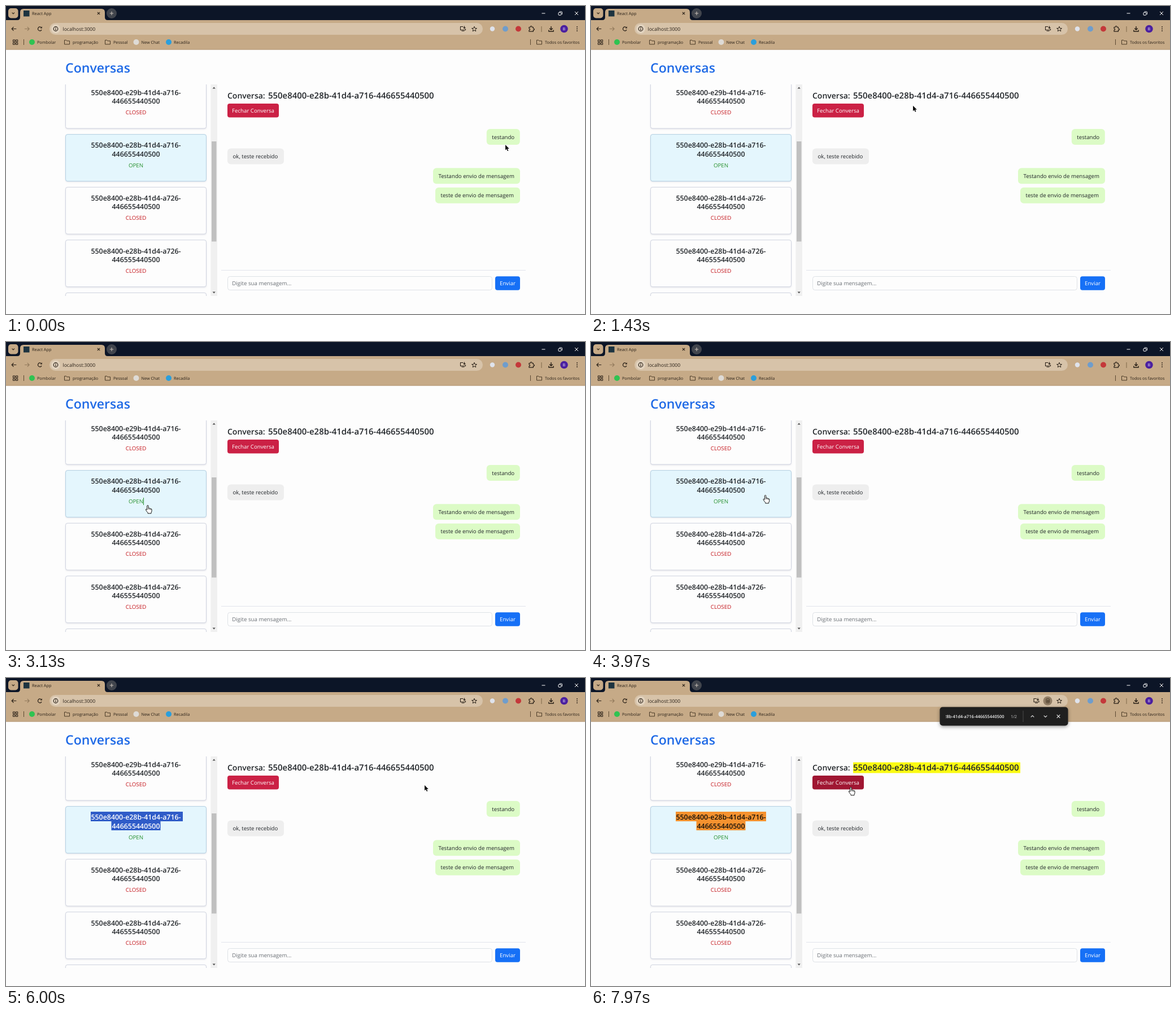
An HTML page with a canvas that plays this animation: 1025 by 546 pixels, repeating every 8000 ms.

```html
<!DOCTYPE html>
<html lang="pt">
<head>
<meta charset="utf-8">
<title>Conversas</title>
<style>
html, body { margin: 0; width: 100%; height: 100%; overflow: hidden; background: #fdfdfd; }
canvas { display: block; width: 1025px; height: 546px; }
</style>
</head>
<body>
<canvas id="stage" width="1025" height="546"></canvas>
<script>
const ctx = document.getElementById('stage').getContext('2d');
const LOOP = 8000;
const FONT = '"Open Sans", "Noto Sans", sans-serif';
const INK = '#2a2118', TAN = '#c6aa87';
const ID = '550e8400-e28b-41d4-a716-446655440500';

// Pointer keys: time, x, y
const PATH = [
  [0, 884, 246], [30, 884, 246], [60, 881, 244], [650, 881, 244], [660, 879, 243],
  [1250, 879, 243], [1430, 572, 176], [1560, 320, 262], [2320, 320, 262],
  [2370, 300, 270], [2690, 300, 270], [2700, 296, 272], [2990, 296, 272],
  [3130, 251, 290], [3320, 251, 290], [3570, 304, 275], [3920, 304, 275],
  [3970, 309, 272], [4430, 155, 254], [5930, 155, 254], [6000, 741, 190],
  [7860, 741, 190], [7970, 460, 194]
];

function pointer(t) {
  let i = 0;
  while (i < PATH.length - 1 && PATH[i + 1][0] <= t) i++;
  const a = PATH[i], b = PATH[i + 1] || a;
  const k = b === a ? 0 : (t - a[0]) / (b[0] - a[0]);
  return [a[1] + (b[1] - a[1]) * k, a[2] + (b[2] - a[2]) * k];
}

const between = (t, a, b) => t >= a && t < b;

function rect(x, y, w, h, fill) {
  ctx.fillStyle = fill;
  ctx.fillRect(x, y, w, h);
}

function box(x, y, w, h, r, fill, stroke, lw = 1) {
  ctx.beginPath();
  ctx.roundRect(x, y, w, h, r);
  if (fill) { ctx.fillStyle = fill; ctx.fill(); }
  if (stroke) { ctx.strokeStyle = stroke; ctx.lineWidth = lw; ctx.stroke(); }
}

function dot(x, y, r, fill) {
  ctx.beginPath();
  ctx.arc(x, y, r, 0, 7);
  ctx.fillStyle = fill;
  ctx.fill();
}

function ring(x, y, r, color, from = 0, to = Math.PI * 2) {
  ctx.beginPath();
  ctx.arc(x, y, r, from, to);
  ctx.strokeStyle = color;
  ctx.lineWidth = 1.2;
  ctx.stroke();
}

function path(d, x, y, stroke, lw = 1.2, fill) {
  ctx.save();
  ctx.translate(x, y);
  const p = new Path2D(d);
  if (fill) { ctx.fillStyle = fill; ctx.fill(p); }
  if (stroke) {
    ctx.strokeStyle = stroke;
    ctx.lineWidth = lw;
    ctx.lineJoin = 'round';
    ctx.stroke(p);
  }
  ctx.restore();
}

function text(s, x, y, size, color, weight = 400, align = 'left') {
  ctx.font = `${weight} ${size}px ${FONT}`;
  ctx.textAlign = align;
  ctx.fillStyle = color;
  ctx.fillText(s, x, y);
}

function folder(x, y) {
  path('M.5 1.5h3.2l1.2 1.4h4.6v6h-9z', x, y - 5, '#4a3a26', 1);
}

function titleBar() {
  rect(0, 0, 1025, 26, '#0c1527');
  box(4, 4, 17.5, 17.5, 5, TAN);
  path('M-2.2 -1l2.2 2.2l2.2 -2.2', 12.8, 12.7, INK);
  path('M0 23q5 0 5 -5v-9q0 -6 6 -6h138q6 0 6 6v9q0 5 5 5v3h-160z', 20, 2, null, 0, TAN);
  rect(31, 8, 10.5, 10.5, '#1d3440');
  text('React App', 46, 16, 7.4, INK);
  path('M-2.2 -2.2l4.4 4.4M2.2 -2.2l-4.4 4.4', 164, 13, INK, 1.1);
  dot(187, 13, 9, '#41454d');
  path('M-3.2 0h6.4M0 -3.2v6.4', 187, 13, '#c9c2b8', 1.1);
  path('M-3 0h6', 951.5, 13, '#fff', 1);
  box(978, 11.5, 4.8, 4.8, 1, null, '#fff');
  path('M0 0h4q1 0 1 1v4', 979.5, 10, '#fff', 0.9);
  path('M-3 -3l6 6M3 -3l-6 6', 1010, 13, '#fff', 1);
}

function toolbar(finding) {
  rect(0, 25, 1025, 52.5, TAN);
  rect(0, 76.5, 1025, 1, '#b79c7a');
  path('M4 0h-8M-.8 -3.3l-3.3 3.3l3.3 3.3', 14.3, 40.5, INK);
  path('M-4 0h8M.8 -3.3l3.3 3.3l-3.3 3.3', 37, 40.5, '#927a5c');
  ring(60, 40.5, 3.4, INK, 0.5, 5.4);
  path('M3.8 -4.2v3.2h-3.2z', 60, 40.5, null, 0, INK);

  box(77, 30, 767, 21, 10.5, '#d7c3a9');
  dot(88, 40.5, 8, '#e2d3bf');
  ring(88, 40.5, 3.8, INK);
  rect(87.4, 40, 1.2, 2.8, INK);
  rect(87.4, 38, 1.2, 1.2, INK);
  text('localhost:3000', 100.5, 43.6, 8.55, INK);

  const ix = finding ? 788 : 808.5;
  path('M1 -3.5h-5v6h9v-2M-2 4.2h5M3 -4.5v4.2M1.2 -2l1.8 1.8l1.8 -1.8', ix, 40, INK, 1.1);
  if (finding) {
    dot(808.5, 40.5, 8, '#927e66');
    box(805.8, 36.8, 5.6, 7.4, 1, null, '#4b3d2b', 1);
    ring(808.8, 41, 1.4, '#4b3d2b');
  }
  let star = '';
  for (let i = 0; i < 10; i++) {
    const a = i * Math.PI / 5 - Math.PI / 2, r = i % 2 ? 2 : 4.7;
    star += (i ? 'L' : 'M') + r * Math.cos(a) + ' ' + r * Math.sin(a);
  }
  path(star + 'z', 829, 41, INK, 1);

  dot(861, 40.5, 4.2, '#dfe3ec');
  dot(884, 40.5, 5, '#6f9dcc');
  dot(907, 40.5, 5, '#c4383a');
  path('M-4 -3h2.4q-.3 -2 1.3 -2t1.3 2h2.4v2.5q2 -.2 2 1.3t-2 1.3v2.6h-7.4v-2.4q1.6 -.2 1.6 -1.5t-1.6 -1.5z', 930, 40.5, INK, 1.2);
  rect(947.5, 36, 1, 10, '#7d6748');
  path('M0 -4.5v6M-2.8 -1l2.8 2.8l2.8 -2.8M-4.2 2v2.5h8.4v-2.5', 965, 40.5, INK, 1.4);
  dot(988, 40.5, 6.8, '#4b20a0');
  text('B', 988, 43, 6.6, '#fff', 400, 'center');
  for (const y of [37, 40.5, 44]) dot(1011, y, 0.95, INK);
}

function bookmarks() {
  for (const x of [12.5, 17.5])
    for (const y of [60, 65]) box(x, y, 3.2, 3.2, 0.3, null, INK, 1.1);
  rect(31, 59, 1, 10, '#5a4830');
  dot(46, 64, 5, '#2fc351');
  dot(230.5, 64, 5, '#dedbd6');
  dot(288, 64, 5, '#2b9fdc');
  folder(103, 64);
  folder(175, 64);
  folder(939, 64);
  rect(928, 59, 1, 10, '#5a4830');
  const labels = [['Pombolar', 55], ['programação', 118], ['Pessoal', 190],
    ['New Chat', 239.5], ['Recadila', 297], ['Todos os favoritos', 954]];
  for (const [s, x] of labels) text(s, x, 66.8, 7.25, INK);
}

function card(y, first, last, status, mark) {
  const open = status === 'OPEN';
  ctx.save();
  ctx.shadowColor = 'rgba(40,50,90,.14)';
  ctx.shadowBlur = 3;
  ctx.shadowOffsetY = 1.2;
  box(105.5, y, 249, 83, 3.5, open ? '#e4f6fd' : '#fdfdfd');
  ctx.restore();
  box(105.5, y, 249, 83, 3.5, null, open ? '#b4cfe2' : '#d0d4e0');
  if (mark) {
    rect(150, 237, mark.wide, 17, mark.fill);
    rect(186.5, 254, 87, 16, mark.fill);
  }
  const ink = mark ? mark.ink : '#212529';
  text(first, 230, y + 23.8, 12.42, ink, 600, 'center');
  text(last, 230, y + 39, 12.42, ink, 600, 'center');
  text(status, 230, y + 58, 9.75, open ? '#27902c' : '#c4161c', 400, 'center');
}

function sidebar(t) {
  let mark = null;
  if (between(t, 4870, 6500)) mark = { wide: 163, fill: '#2f5cc8', ink: '#fff' };
  else if (between(t, 6500, 6800)) mark = { wide: 163, fill: '#c8c8c8', ink: '#212529' };
  else if (t >= 6800) mark = { wide: 160, fill: '#f5922f', ink: '#14100a' };

  ctx.save();
  ctx.beginPath();
  ctx.rect(100, 139, 260, 375);
  ctx.clip();
  const ids = ['e29b-41d4-a716', 'e28b-41d4-a716', 'e28b-41d4-a726', 'e28b-41d4-a726', 'e28b-41d4-a726'];
  ids.forEach((id, i) => {
    const tail = i === 3 ? '446555440500' : '446655440500';
    card(134 + i * 93.6, `550e8400-${id}-`, tail, i === 1 ? 'OPEN' : 'CLOSED', i === 1 && mark);
  });
  ctx.restore();
  if (between(t, 3100, 3330)) rect(243, 276, 1, 13, '#27902c');

  rect(362.5, 139, 11.5, 375, '#f0f0f0');
  rect(364, 240, 8.5, 177.5, '#c0c0c0');
  path('M-2.6 1.4h5.2l-2.6 -3z', 368.2, 145, null, 0, '#505050');
  path('M-2.6 -1.4h5.2l-2.6 3z', 368.2, 508, null, 0, '#505050');
}

function bubble(s, x, y, w, mine) {
  box(x, y, w, 28, 6, mine ? '#dcfbc6' : '#eeeeee');
  text(s, x + 9.5, y + 17.6, 9.66, '#212529');
}

function chat(t, hover) {
  if (between(t, 4870, 4970)) {
    text('Carregando mensagens...', 392, 160.6, 9.66, '#212529');
  } else {
    if (t >= 6800) rect(464, 149.5, 296, 19, '#fbfb12');
    text('Conversa:', 392, 164.3, 14, '#212529', 600);
    text(ID, 464, 164.3, 14.93, '#212529', 600);
    box(392, 173, 91, 24.5, 4, hover ? '#a01632' : '#cb2145');
    text('Fechar Conversa', 437.5, 188.8, 9.66, '#fff', 400, 'center');
    bubble('testando', 850.8, 218, 59, true);
    bubble('ok, teste recebido', 392, 252.5, 100, false);
    bubble('Testando envio de mensagem', 756, 287.3, 154, true);
    bubble('teste de envio de mensagem', 760, 321.7, 150, true);
  }
  rect(381, 468, 539, 1, '#e2e4ec');
  box(392.5, 479.5, 468, 24, 4, '#fdfdfd', '#dee2e6');
  text('Digite sua mensagem...', 400.3, 495.2, 9.7, '#6a6f75');
  box(866, 479.3, 44, 24.4, 4, '#1670f6');
  text('Enviar', 888, 495.2, 9.66, '#fff', 400, 'center');
}

function findBar(t) {
  ctx.save();
  ctx.shadowColor = 'rgba(0,0,0,.4)';
  ctx.shadowBlur = 6;
  ctx.shadowOffsetY = 2;
  box(617.5, 51.5, 227, 33, 5, '#1f1f1f');
  ctx.restore();
  const filled = t >= 6800;
  if (filled) {
    ctx.save();
    ctx.beginPath();
    ctx.rect(628, 55, 105, 25);
    ctx.clip();
    text(ID, 731.5, 70.5, 7.5, '#f2f2f2', 600, 'right');
    ctx.restore();
    text('1/2', 743, 70.5, 7.3, '#c9c9c9');
  }
  if (t < 7340 || between(t, 7700, 7870)) rect(filled ? 732 : 628, 63, 1, 10, '#fff');
  rect(764.5, 58, 1, 20, '#4a4a4a');
  path('M-2.8 1.4l2.8 -2.8l2.8 2.8', 781.5, 68, '#e3e3e3');
  path('M-2.8 -1.4l2.8 2.8l2.8 -2.8', 804.5, 68, '#e3e3e3');
  path('M-2.8 -2.8l5.6 5.6M2.8 -2.8l-5.6 5.6', 827.5, 68, '#e3e3e3');
}

function drawPointer(x, y, hand) {
  if (hand) {
    path('M-1.3 7.5V.8q0 -1.2 1.2 -1.2t1.2 1.2v3.7q1.7 -.6 2.1 .5q1.6 -.4 2 .7q1.8 -.2 1.8 1.4v2.6q0 1.4 -1 2.6v1.6h-6v-1.4q-1.9 -2 -3.4 -4.6q-.7 -1.5 .5 -1.6q.7 0 1.6 1.2z', x, y, '#111', 1, '#fff');
    path('M1.1 4.5v2.6M3.2 5v2.3M5.2 5.7v2', x, y, '#111', 0.7);
  } else {
    path('M0 0v9.6l2.2 -2l1.6 3.5l1.6 -.7l-1.6 -3.4h3z', x, y, '#fff', 1.2, '#0a0a0a');
    path('M0 0v9.6l2.2 -2l1.6 3.5l1.6 -.7l-1.6 -3.4h3z', x, y, null, 0, '#0a0a0a');
  }
}

function draw(t) {
  const [x, y] = pointer(t);
  const onButton = x > 392 && x < 483 && y > 173 && y < 198;
  const onCard = x > 105 && x < 355 && y > 139 && y < 514;
  const finding = t >= 6500;
  ctx.textRendering = 'geometricPrecision';
  rect(0, 0, 1025, 546, '#fdfdfd');
  titleBar();
  toolbar(finding);
  bookmarks();
  text('Conversas', 105, 118.3, 23.1, '#1f6ae6', 600);
  sidebar(t);
  chat(t, onButton);
  if (finding) findBar(t);
  drawPointer(x, y, onButton || onCard);
}

const start = performance.now();
function tick(now) {
  draw(Math.max(0, now - start) % LOOP);
  requestAnimationFrame(tick);
}
draw(0);
requestAnimationFrame(tick);
</script>
</body>
</html>
```
